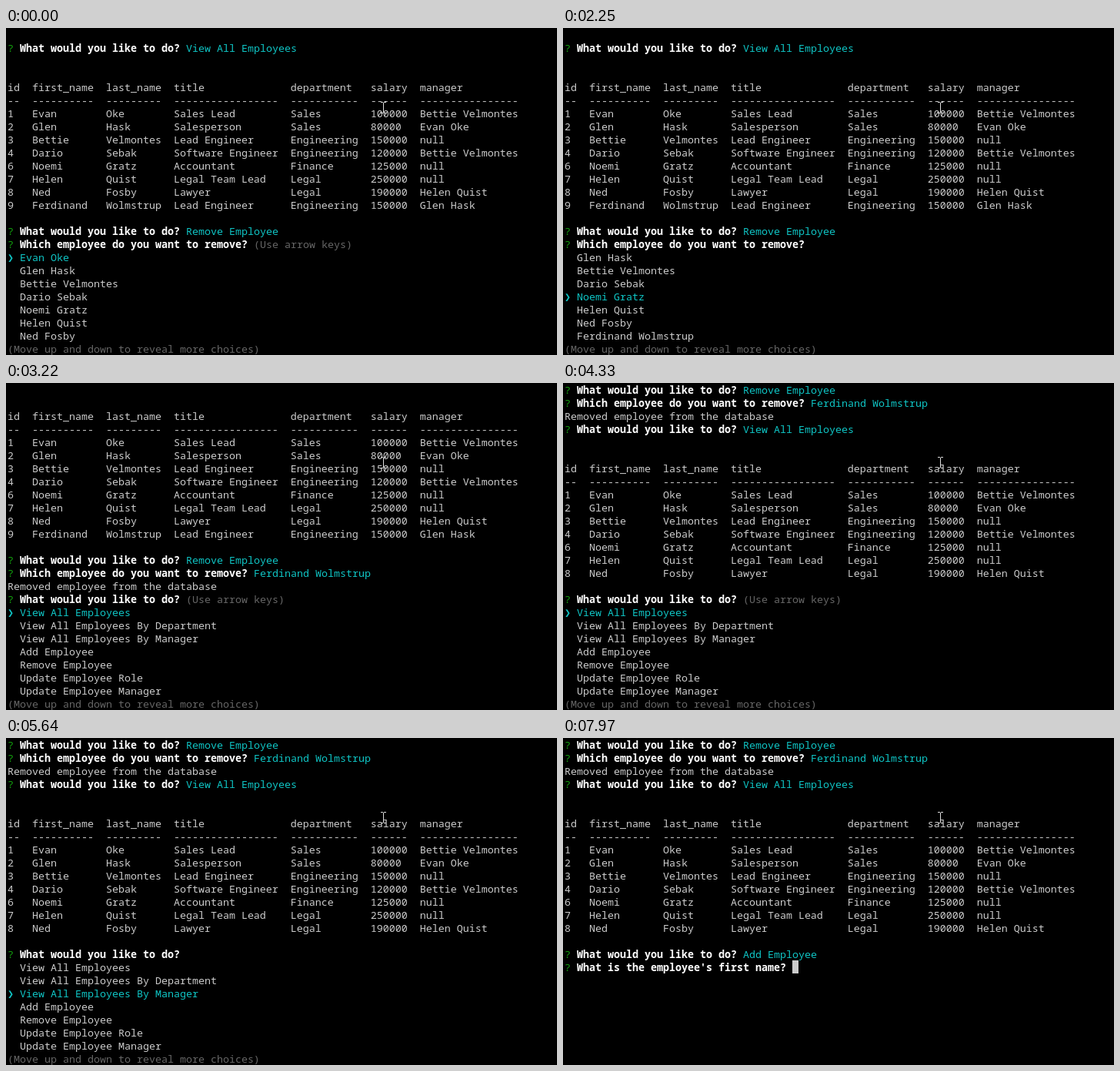
Recreate the animation shown at these times as an HTML page with a canvas. Size 716 by 425 pixels, loop 8 s.

```html
<!DOCTYPE html>
<html lang="en">
<head>
<meta charset="utf-8">
<title>Employee tracker</title>
<style>
html, body { margin: 0; width: 716px; height: 425px; overflow: hidden; background: #000; }
canvas { display: block; }
</style>
</head>
<body>
<canvas id="screen" width="716" height="425"></canvas>
<script>
const ctx = document.getElementById('screen').getContext('2d');
const LOOP = 8000, CELL = 8, ROW = 17, LEFT = 2, BASELINE = 14;
const GREY = '#ccc', WHITE = '#fff', GREEN = '#13a10e', CYAN = '#0fc5c5', DIM = '#666';
const FONT = '13.3333px "Noto Sans Mono", "DejaVu Sans Mono", monospace';

const staff = [
  '1|Evan|Oke|Sales Lead|Sales|100000|Bettie Velmontes',
  '2|Glen|Hask|Salesperson|Sales|80000|Evan Oke',
  '3|Bettie|Velmontes|Lead Engineer|Engineering|150000|null',
  '4|Dario|Sebak|Software Engineer|Engineering|120000|Bettie Velmontes',
  '6|Noemi|Gratz|Accountant|Finance|125000|null',
  '7|Helen|Quist|Legal Team Lead|Legal|250000|null',
  '8|Ned|Fosby|Lawyer|Legal|190000|Helen Quist',
  '9|Ferdinand|Wolmstrup|Lead Engineer|Engineering|150000|Glen Hask',
].map(line => line.split('|'));
const names = staff.map(person => person[1] + ' ' + person[2]);
const heads = ['id', 'first_name', 'last_name', 'title', 'department', 'salary', 'manager'];
const widths = [2, 10, 9, 17, 11, 6, 16];
const actions = ['View All Employees', 'View All Employees By Department',
  'View All Employees By Manager', 'Add Employee', 'Remove Employee',
  'Update Employee Role', 'Update Employee Manager'];

// A line is a list of [text, colour] segments.
const plain = (text = '') => [[text, GREY]];
const ask = (question, answer = '', colour = CYAN) =>
  [['? ', GREEN], [question + ' ', WHITE], [answer, colour]];
const askAction = (answer, colour) => ask('What would you like to do?', answer, colour);
const askRemove = (answer, colour) => ask('Which employee do you want to remove?', answer, colour);
const hint = first => first ? '(Use arrow keys)' : '';

function table(people) {
  const format = cells => plain(cells.map((c, i) => c.padEnd(widths[i])).join('  '));
  return [format(heads), format(widths.map(w => '-'.repeat(w))), ...people.map(format), plain()];
}

// Seven visible choices; past the middle row the list itself scrolls and wraps.
function menu(items, selected) {
  const start = Math.max(0, selected - 3);
  const lines = Array.from({ length: 7 }, (_, i) => {
    const item = items[(start + i) % items.length];
    return start + i === selected ? [['❯ ', CYAN], [item, CYAN]] : plain('  ' + item);
  });
  return [...lines, [['(Move up and down to reveal more choices)', DIM]]];
}

const removed = [askAction('Remove Employee'), askRemove(names[7]),
  plain('Removed employee from the database')];

const choosing = selected => [plain(), askAction(actions[0]), plain(), plain(), ...table(staff),
  askAction('Remove Employee'), askRemove(hint(!selected), DIM), ...menu(names, selected)];

const afterRemoval = () => [plain(), plain(), ...table(staff), ...removed,
  askAction(hint(true), DIM), ...menu(actions, 0)];

const listed = () => [...removed, askAction(actions[0]), plain(), plain(),
  ...table(staff.slice(0, 7))];

const nextAction = selected => [...listed(), askAction(hint(!selected), DIM),
  ...menu(actions, selected)];

const adding = cursor => [...listed(), askAction('Add Employee'),
  ask("What is the employee's first name?", cursor ? '█' : '', GREY)];

const steps = [
  [0, choosing, 0], [870, choosing, 1], [1140, choosing, 2], [2040, choosing, 3],
  [2250, choosing, 4], [2330, choosing, 5], [2480, choosing, 6], [2860, choosing, 7],
  [3220, afterRemoval],
  [4330, nextAction, 0], [5380, nextAction, 1], [5640, nextAction, 2], [5850, nextAction, 3],
  [6450, adding, true], [7460, adding, false], [7970, adding, true],
];

function drawLine(line, row) {
  let x = LEFT;
  for (const [text, colour] of line) {
    ctx.fillStyle = colour;
    ctx.font = (colour === WHITE ? 'bold ' : '') + FONT;
    if (text === '█') ctx.fillRect(x, row * ROW, CELL, ROW);
    else ctx.fillText(text, x, row * ROW + BASELINE);
    x += text.length * CELL;
  }
}

function drawMouse() {
  ctx.fillStyle = '#ddd';
  ctx.fillRect(490, 97, 1, 13);
  for (const y of [96, 110]) {
    ctx.fillRect(487, y, 3, 1);
    ctx.fillRect(491, y, 3, 1);
  }
}

function frame() {
  const time = performance.now() % LOOP;
  const [, screen, state] = steps.findLast(step => step[0] <= time);
  ctx.fillStyle = '#000';
  ctx.fillRect(0, 0, 716, 425);
  screen(state).forEach(drawLine);
  drawMouse();
  requestAnimationFrame(frame);
}
frame();
</script>
</body>
</html>
```
